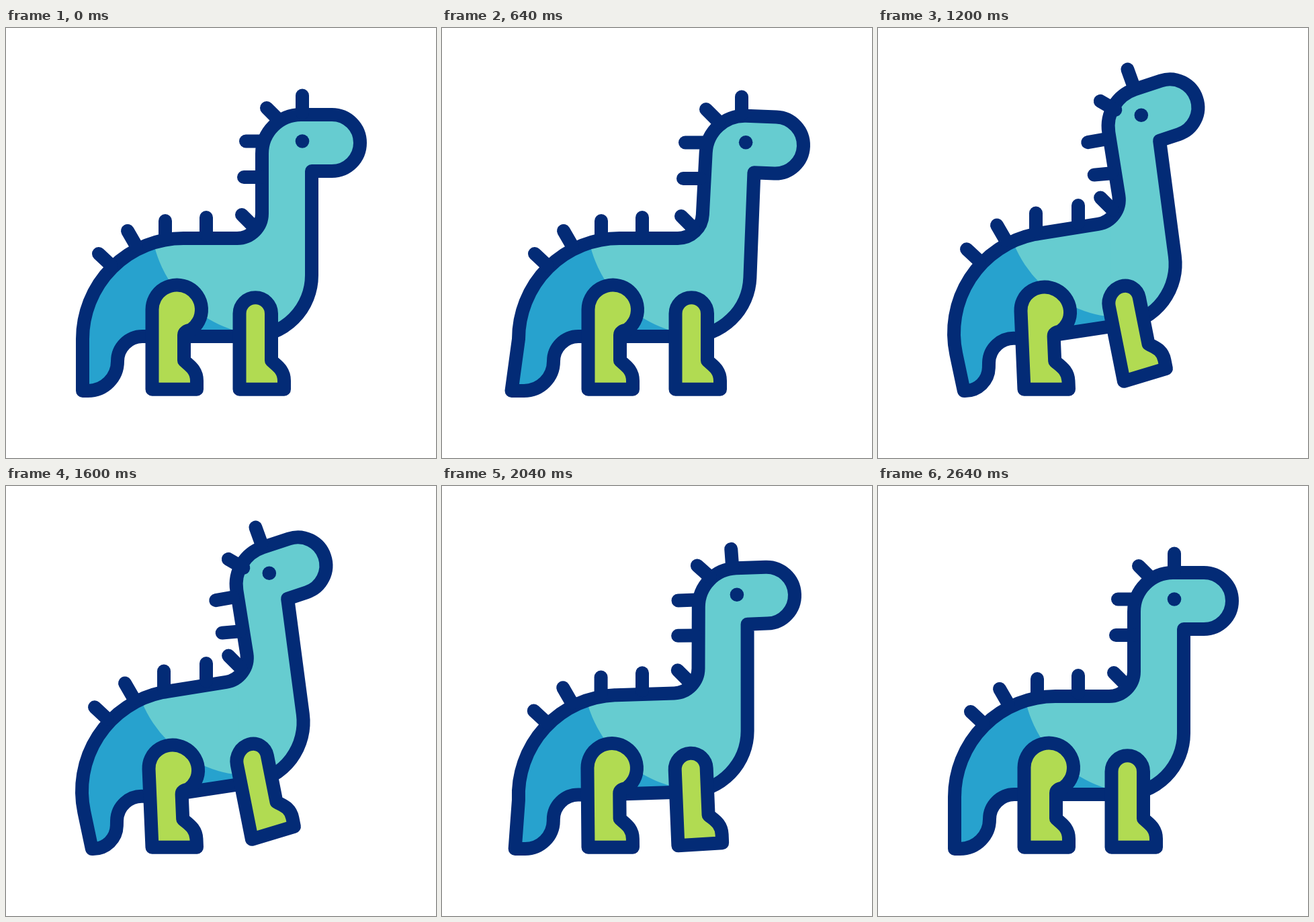
An HTML page with a canvas that plays this animation: 640 by 640 pixels, repeating every 3 s.

```html
<!DOCTYPE html>
<html lang="en">
<head>
<meta charset="utf-8">
<title>Stomping dinosaur</title>
<style>
  html, body { margin: 0; width: 100%; height: 100%; overflow: hidden; background: #fff; }
  canvas { display: block; width: 100vw; height: 100vh; }
</style>
</head>
<body>
<canvas id="stage" width="640" height="640"></canvas>
<script>
const ctx = document.getElementById('stage').getContext('2d');
const LOOP = 3000;
const NAVY = '#032b76', TEAL = '#66ccd0', BLUE = '#27a2ce', GREEN = '#b1db52', YELLOW = '#ffcb4f';
const RAD = Math.PI / 180;

// Resting spikes: [tip x, tip y, direction towards the body in degrees]
const NECK_SPIKES = [[441, 100.5, 90], [388, 119, 45], [357, 168.5, 0], [354, 222, 0], [351, 278, 45]];
const BACK_SPIKES = [[298, 282, 90], [237, 287, 90], [181, 302, 60], [138, 336, 43]];
const SPIKE_LENGTH = 26;

const HIND_LEG = new Path2D('M217.5 537.7V419A36.75 36.75 0 1 1 275 449.5Q265 451 265 457V495' +
                            'C272 502 284 508 284 525V537.7Z');
const FRONT_LEG = new Path2D('M347.5 537.7V425A23.75 23.75 0 0 1 395 425V495' +
                             'C402 502 414 508 414 525V537.7Z');

const phase = (t, from, to) => Math.min(1, Math.max(0, (t - from) / (to - from)));
const easeIn = (u, n) => u ** n;
const easeOut = (u, n) => 1 - (1 - u) ** n;
const easeInOut = (u, n) => u < 0.5 ? (2 * u) ** n / 2 : 1 - (2 - 2 * u) ** n / 2;

// Part of the way from standing still to the given affine map
function partial(weight, ...map) {
  return new DOMMatrix([1, 0, 0, 1, 0, 0].map((rest, i) => rest + (map[i] - rest) * weight));
}

function apply(matrix, x, y) {
  const p = matrix.transformPoint({ x, y });
  return [p.x, p.y];
}

// The head turns rigidly about the middle of the snout
function headMatrix(lean, rear) {
  return new DOMMatrix()
    .translate(485 + 11 * lean - 62 * rear, 171 + 3.5 * lean - 56.5 * rear)
    .rotate(2.2 * lean - 20.7 * rear)
    .translate(-485, -171);
}

function bodyPath(lean, rear, head) {
  const torso = partial(rear, 1.01, -0.153, 0.101, 1.05, -52.4, 15.6);
  const tip = [114 - 10.5 * lean + 24.5 * rear, 540];
  const [neckX, neckY] = apply(torso, 381, 313);
  const corners = [
    [neckX + 5 * lean * (1 - rear), neckY, 37],
    [...apply(head, 381 + 2 * lean + 12 * rear, 129), 58],
    [...apply(head, 527, 129), 42],
    [...apply(head, 527, 213), 42],
    [...apply(head, 455, 213), 0],
    [...apply(torso, 455, 459), 91],
    [...apply(torso, 225, 459), 0],
    [166, 459, 37],
    [166 - 2 * rear, 540, 44 - 9 * rear],
    [...tip, 0]
  ];
  const path = new Path2D();
  path.moveTo(...tip);
  path.arc(264 - rear, 463 - 9 * rear, 150, Math.PI - 0.21 * rear, Math.PI * 1.5 - 0.152 * rear);
  corners.forEach(([x, y, r], i) => {
    if (r) path.arcTo(x, y, corners[i + 1][0], corners[i + 1][1], r);
    else path.lineTo(x, y);
  });
  path.closePath();
  return path;
}

function disc(x, y, r, fill) {
  ctx.fillStyle = fill;
  ctx.beginPath();
  ctx.arc(x, y, r, 0, 2 * Math.PI);
  ctx.fill();
}

function line(x1, y1, x2, y2) {
  ctx.beginPath();
  ctx.moveTo(x1, y1);
  ctx.lineTo(x2, y2);
  ctx.stroke();
}

function spike(x, y, degrees) {
  const angle = degrees * RAD;
  line(x, y, x + SPIKE_LENGTH * Math.cos(angle), y + SPIKE_LENGTH * Math.sin(angle));
}

function drawBody(lean, rear) {
  const head = headMatrix(lean, rear);
  const path = bodyPath(lean, rear, head);
  const lightX = 392 - 26.5 * rear, lightY = 281.5 - 27 * rear;
  ctx.save();
  ctx.clip(path);
  ctx.fillStyle = BLUE;
  ctx.fillRect(0, 0, 640, 640);
  disc(lightX, lightY, 176.5, TEAL);
  ctx.fillRect(lightX - 20, 0, 640, 640);
  ctx.restore();
  ctx.stroke(path);
  disc(...apply(head, 441, 168.5), 10.3, NAVY);

  NECK_SPIKES.forEach(([x, y, angle], i) => spike(
    x + 5 * lean - (75 - 12.5 * i) * rear,
    y + 2 * lean - 8.5 * (i - 2.2) ** 2 * rear,
    angle - (20 - 5 * i) * rear));
  BACK_SPIKES.forEach(([x, y, angle], i) => spike(
    x - 2 * i * rear,
    y - 18 / (1 + 0.55 * i) * rear,
    angle));
}

function drawLeg(shape, matrix) {
  const path = new Path2D();
  path.addPath(shape, matrix);
  ctx.fillStyle = GREEN;
  ctx.fill(path);
  ctx.stroke(path);
}

// Three blobs fan out from the front foot and shrink away
function drawDust(t) {
  const travel = easeOut(phase(t, 2080, 2480), 4);
  const size = phase(t, 2080, 2160) * (1 - easeIn(phase(t, 2320, 2560), 2));
  if (size <= 0) return;
  ctx.save();
  ctx.strokeStyle = YELLOW;
  ctx.lineWidth = 20.5 * size;
  for (const i of [-1, 0, 1]) {
    const x = 424 + (68 - 6.5 * i) * travel;
    const y = 530 + 49 * i * travel;
    const dx = 2.6 * size, dy = dx * 0.16 * i;
    line(x - dx, y - dy, x + dx, y + dy);
  }
  ctx.restore();
}

function draw(t) {
  const lean = easeInOut(phase(t, 160, 640), 2.45) - easeInOut(phase(t, 2160, 2640), 2.45);
  const rear = easeOut(phase(t, 720, 1360), 3.75) - easeIn(phase(t, 1440, 2080), 3.75);
  ctx.fillStyle = '#fff';
  ctx.fillRect(0, 0, 640, 640);
  ctx.strokeStyle = NAVY;
  ctx.lineWidth = 20;
  ctx.lineCap = ctx.lineJoin = 'round';
  drawDust(t);
  drawBody(lean, rear);
  drawLeg(HIND_LEG, partial(rear, 1, 0, 0.042, 0.98, -22.6, 10.8));
  drawLeg(FRONT_LEG, partial(rear, 0.947, -0.286, 0.197, 0.985, -69, 95.5));
}

function tick() {
  draw(performance.now() % LOOP);
  requestAnimationFrame(tick);
}
tick();
</script>
</body>
</html>
```
